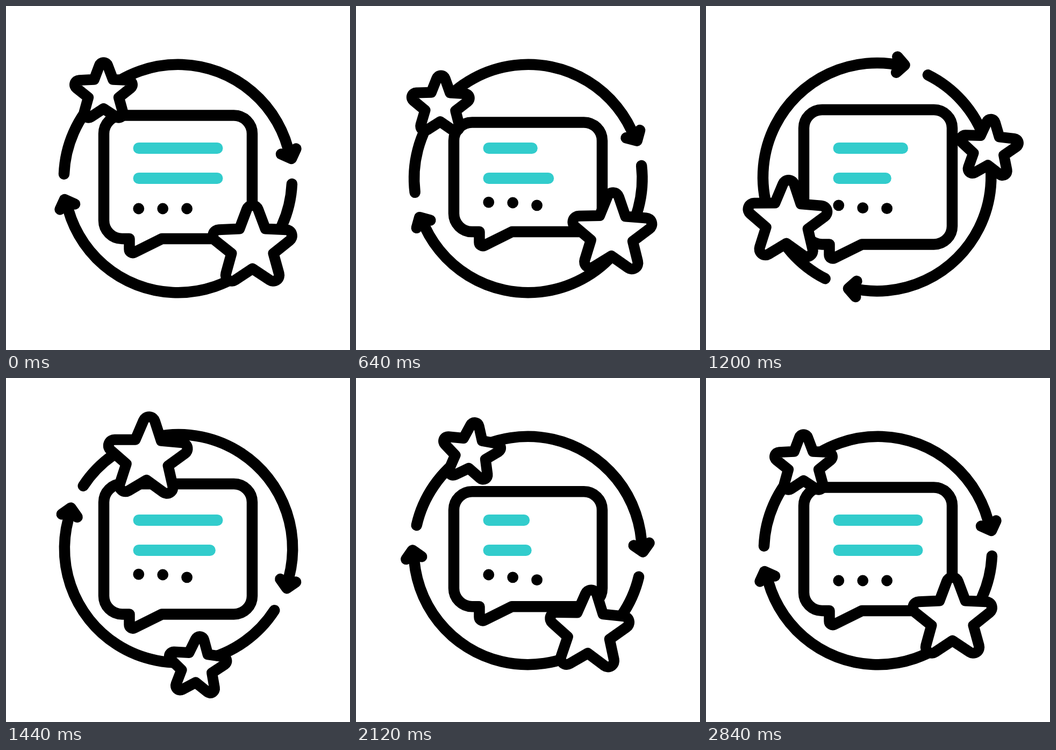
Write an HTML page with a canvas that moves like this. It is 640 by 640 pixels and loops after 3 s.

```html
<!DOCTYPE html>
<html lang="en">
<head>
<meta charset="utf-8">
<title>Rating feedback loop</title>
<style>
  html, body { margin: 0; width: 100%; height: 100%; overflow: hidden; background: #fff; }
  canvas { display: block; width: 640px; height: 640px; }
</style>
</head>
<body>
<canvas id="stage" width="640" height="640"></canvas>
<script>
const ctx = document.getElementById('stage').getContext('2d');
const LOOP = 3000, STEP = 40, START = 200, END = 2840;
const INK = '#000', TEAL = '#32cccc';
const RAD = Math.PI / 180;

// Keys are [time, value, slope = 0], joined by cubic Hermite curves.
const SPIN = [
  [200, 0, -.07], [510, -12], [640, -9.2, .05], [960, 38, .241], [1440, 210.6, .407],
  [1840, 332, .193], [2120, 370.6, .083], [2318, 378.8], [2440, 375.7, -.047], [2840, 360, -.03]
];
const SQUASH = [[200, 0], [595, 13.2], [1260, -11], [1915, 13.2], [2580, -11], [2840, 0]];
const TILT_SMALL = [[200, 0], [2160, 8], [2840, 0]];
const TILT_LARGE = [[200, 0], [640, 1.7], [2160, 3.3], [2840, 0]];

function curve(keys, t) {
  const last = keys.length - 1;
  if (t <= keys[0][0]) return keys[0][1];
  if (t >= keys[last][0]) return keys[last][1];
  const i = keys.findIndex(k => k[0] > t);
  const [t0, a, m = 0] = keys[i - 1];
  const [t1, b, n = 0] = keys[i];
  const d = t1 - t0, u = (t - t0) / d, w = 1 - u;
  return a * w * w * (1 + 2 * u) + b * u * u * (3 - 2 * u) + d * u * w * (m * w - n * u);
}

// Repeated ease from 0 to 1 and back.
function pulse(t, begin, period, count) {
  const p = (t - begin) / period;
  if (p <= 0 || p >= count) return 0;
  const u = 1 - Math.abs(1 - 2 * (p % 1));
  return u * u * (3 - 2 * u);
}

function pen(color, width) {
  ctx.strokeStyle = color;
  ctx.lineWidth = width;
  ctx.lineCap = ctx.lineJoin = 'round';
}

function polyline(...pts) {
  ctx.beginPath();
  pts.forEach(p => ctx.lineTo(...p));
  ctx.stroke();
}

function ring(angle) {
  ctx.save();
  ctx.translate(320, 319);
  ctx.rotate(angle * RAD);
  ctx.translate(-320, -319);
  pen(INK, 20.5);
  const arc = (from, to) => {
    ctx.beginPath();
    ctx.arc(320, 321, 212.2, from * RAD, to * RAD);
    ctx.stroke();
  };
  arc(182.2, 349);
  polyline([512, 275.5], [531, 284], [539.5, 265.5]);
  arc(2.7, 168.8);
  polyline([100.5, 378.5], [109, 360], [128, 368.5]);
  ctx.restore();
}

function bubble(h) {
  const top = 203.5 + h, low = 433 - h, l = 182, r = 458, c = 34;
  pen(INK, 20.5);
  ctx.beginPath();
  ctx.moveTo(290, low);
  ctx.arcTo(r, low, r, top, c);
  ctx.arcTo(r, top, l, top, c);
  ctx.arcTo(l, top, l, low, c);
  ctx.arcTo(l, low, 230, low, c);
  ctx.lineTo(229.5, low);
  ctx.arcTo(229.5, low + 30, 290, low, 6.5);
  ctx.closePath();
  ctx.stroke();
}

function content(t) {
  pen(TEAL, 21);
  for (let i = 0; i < 2; i++) {
    const y = 264.5 + 56 * i;
    const end = 393 - 82.5 * pulse(t, START + 160 * i, 1240, 2);
    polyline([247, y], [end, y]);
  }
  ctx.fillStyle = INK;
  for (let i = 0; i < 3; i++) {
    const y = 377 - 12.3 * pulse(t, START + 120 * i, 800, 3);
    ctx.beginPath();
    ctx.arc(246.8 + 44.9 * i, y, 10.4, 0, 2 * Math.PI);
    ctx.fill();
  }
}

// The star orbits the middle and stays almost upright.
function star(x, y, size, spin, tilt) {
  const point = i => {
    const a = (i * 36 - 90) * RAD, d = (i % 2 ? 41 : 97.3) * size;
    return [d * Math.cos(a), d * Math.sin(a)];
  };
  ctx.save();
  ctx.translate(320, 325);
  ctx.rotate(spin * RAD);
  ctx.translate(x - 320, y - 325);
  ctx.rotate((tilt - spin) * RAD);
  ctx.beginPath();
  ctx.moveTo(...point(-1));
  for (let i = 0; i < 10; i += 2) {
    ctx.arcTo(...point(i), ...point(i + 1), 11.2 * size);
    ctx.lineTo(...point(i + 1));
  }
  ctx.closePath();
  ctx.fillStyle = '#fff';
  ctx.fill();
  pen(INK, 20);
  ctx.stroke();
  ctx.restore();
}

function draw(now) {
  const t = Math.min(END, Math.floor((now % LOOP) / STEP) * STEP);
  const spin = curve(SPIN, t);
  ctx.fillStyle = '#fff';
  ctx.fillRect(0, 0, 640, 640);
  ring(spin);
  bubble(curve(SQUASH, t));
  content(t);
  star(181.5, 161, .728, spin, curve(TILT_SMALL, t));
  star(458.5, 447.7, 1, spin, curve(TILT_LARGE, t));
}

const begin = performance.now();
function tick() {
  draw(performance.now() - begin);
  requestAnimationFrame(tick);
}
tick();
</script>
</body>
</html>
```
